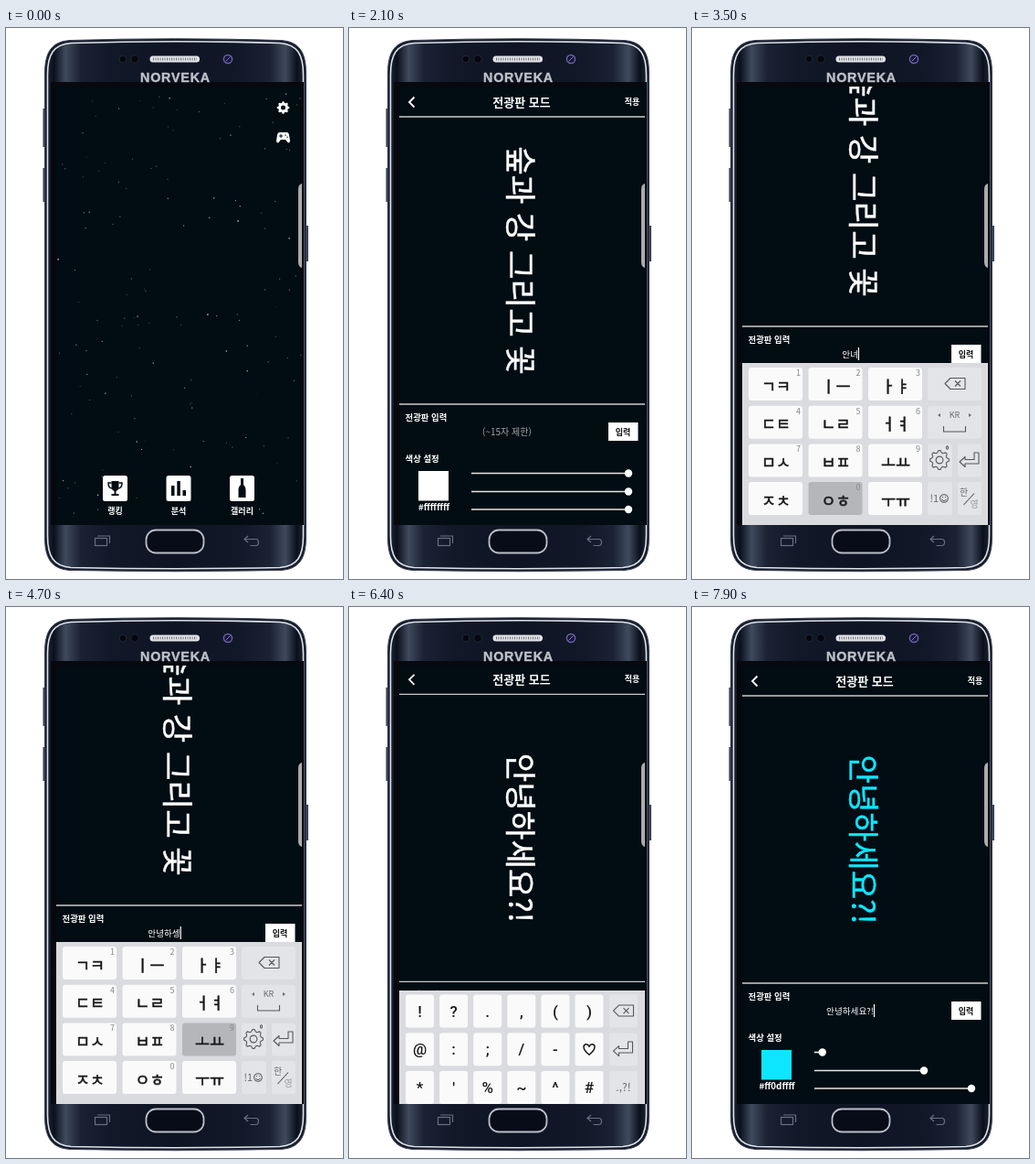
These frames come from a looping animation (369 by 602 pixels, 8 s). An HTML page:

```html
<!DOCTYPE html>
<html lang="ko">
<head>
<meta charset="utf-8">
<title>LED sign mode</title>
<style>
html, body { margin: 0; width: 100%; height: 100%; overflow: hidden; background: #fff; }
svg { display: block; width: 100vw; height: 100vh; }
text { font-family: "Noto Sans CJK KR", "Noto Sans CJK JP", "Noto Sans CJK", sans-serif; fill: #fff; }
.b { font-weight: 700; }
.mid { text-anchor: middle; }
.rule { stroke: #c9cbcd; stroke-width: 1.3; }
.chev { fill: none; stroke: #fff; stroke-width: 1.8; }
.key { fill: #fafafa; }
.fn { fill: #e3e4e7; }
.key.on, .fn.on { fill: #b5b6ba; }
.ink { fill: none; stroke: #55585c; stroke-width: 1.1; stroke-linejoin: round; }
#pad text { fill: #17181a; }
#pad .jamo { stroke: #17181a; stroke-width: .5; }
#pad .num { fill: #85878b; font-size: 9px; text-anchor: end; }
#pad .soft { fill: #66696d; }
#pad .pale { fill: #9a9da1; }
#led { stroke-width: .5; }

.slide, #scroll, #pad, #rest, #modes, #knob { animation: 8s linear infinite; }
#settings { animation-name: settings; }
#sign { animation-name: sign; }
#scroll { animation-name: scroll; }
#pad { animation-name: pad; }
#rest { animation-name: rest; }
#modes { animation-name: modes; }
#knob { animation-name: knob; }
@keyframes settings {
  0%, 3.6% { transform: translateX(270px); }
  3.75% { transform: translateX(250px); }
  5% { transform: translateX(90px); }
  6.25% { transform: translateX(22px); }
  7.5% { transform: translateX(4px); }
  8.5%, 100% { transform: none; }
}
@keyframes sign {
  0%, 18.6% { transform: translateX(270px); }
  18.75% { transform: translateX(257px); }
  20% { transform: translateX(90px); }
  21.25% { transform: translateX(22px); }
  22.5% { transform: translateX(4px); }
  23.6%, 100% { transform: none; }
}
@keyframes scroll {
  0%, 28.4% { transform: none; }
  28.75% { transform: translateY(-22px); }
  30% { transform: translateY(-66px); }
  31.25%, 77.2% { transform: translateY(-85px); }
  77.5% { transform: translateY(-70px); }
  78.75% { transform: translateY(-24px); }
  80% { transform: translateY(-1.7px); }
  81.25%, 100% { transform: none; }
}
@keyframes pad {
  0%, 28.4% { transform: translateY(180px); }
  28.75% { transform: translateY(130px); }
  30% { transform: translateY(45px); }
  31.25%, 77.2% { transform: none; }
  77.5% { transform: translateY(6px); }
  78.75% { transform: translateY(24px); }
  80% { transform: translateY(52px); }
  81.25% { transform: translateY(108px); }
  82.5% { transform: translateY(155px); }
  83.75%, 100% { transform: translateY(180px); }
}
@keyframes rest {
  0%, 9.6% { transform: translateY(-98px); }
  12.4%, 100% { transform: none; }
}
@keyframes modes {
  0%, 10% { opacity: 0; }
  12.4%, 100% { opacity: 1; }
}
@keyframes knob {
  0%, 17.6% { transform: translateX(-3px); }
  18.75% { transform: none; }
  20%, 100% { transform: translateX(9px); }
}
</style>
</head>
<body>
<svg viewBox="0 0 369 602" preserveAspectRatio="none">
  <defs>
    <linearGradient id="metal">
      <stop offset="0" stop-color="#1c2433"/><stop offset=".025" stop-color="#0b101c"/>
      <stop offset=".07" stop-color="#3f4a5d"/><stop offset=".13" stop-color="#1a2233"/>
      <stop offset=".25" stop-color="#111828"/><stop offset=".5" stop-color="#0e1423"/>
      <stop offset=".75" stop-color="#111828"/><stop offset=".87" stop-color="#1a2233"/>
      <stop offset=".93" stop-color="#3f4a5d"/><stop offset=".975" stop-color="#0b101c"/>
      <stop offset="1" stop-color="#1c2433"/>
    </linearGradient>
    <clipPath id="view"><rect x="55" y="64" width="269" height="479"/></clipPath>
  </defs>

  <g id="phone">
    <path d="M41.500 88v42M41.500 153v37M330 216v39" stroke="#3a4254" stroke-width="2"/>
    <path d="M42.500 50C42.500 26 50 15 70 13.500Q185.500 10 301 13.500C321 15 328.500 26 328.500 50V556C328.500 580 321 591 301 592.500Q185.500 595 70 592.500C50 591 42.500 580 42.500 556Z"
      fill="#161d2c" stroke="#3a4254"/>
    <path d="M45.500 51C45.500 29 52 18 71 16.500Q185.500 13 300 16.500C319 18 325.500 29 325.500 51V555C325.500 577 319 588 300 589.500Q185.500 592 71 589.500C52 588 45.500 577 45.500 555Z"
      fill="url(#metal)" stroke="#dfe2e8" stroke-width="1.600"/>
    <rect x="49" y="59" width="277" height="484" fill="#07090e"/>
    <g fill="#05070d" stroke="#262d3c" stroke-width=".8">
      <circle cx="128" cy="34" r="3.800"/><circle cx="141" cy="34" r="4.200"/>
    </g>
    <rect x="157.500" y="30.500" width="54.500" height="7" rx="3.500" fill="#e3e4e8"/>
    <path d="M161 34h48" stroke="#6d7079" stroke-width="3" stroke-dasharray="1 1.500"/>
    <circle cx="243" cy="34" r="4.600" fill="#161539" stroke="#6a62a6" stroke-width="1.500"/>
    <path d="M240.500 36.500l5-5" stroke="#8a7fc0"/>
    <text class="mid" x="185.500" y="58.500" stroke="#bfc3ca" stroke-width=".4" style="font:bold 14.300px 'Liberation Sans',sans-serif;letter-spacing:.8px;fill:#bfc3ca">NORVEKA</text>
    <rect x="153.500" y="548.500" width="63" height="25" rx="10.500" fill="#070c18" stroke="#b9bec8" stroke-width="1.800"/>
    <g fill="none" stroke="#667080" stroke-width="1.200">
      <rect x="97.500" y="557.500" width="13" height="8"/><path d="M100 555h13.500v8"/>
      <path d="M265 555l-4 3.500l4 3.500M261.500 558.500h12q3 0 3 3.500t-3 3.500h-6"/>
    </g>
  </g>

  <g clip-path="url(#view)">
    <g id="home"><rect x="55" y="64" width="269" height="479" fill="#010c13"/></g>
    <g id="settings" class="slide"></g>
    <g id="sign" class="slide">
      <rect x="55" y="64" width="269" height="479" fill="#010c13"/>
      <g id="scroll">
        <path class="chev" d="M71.500 75.500l-5.500 5.500l5.500 5.500"/>
        <text class="b mid" x="189" y="85.500" font-size="13">전광판 모드</text>
        <text class="b mid" x="310" y="84" font-size="9">적용</text>
        <path class="rule" d="M55 97h269M55 411h269"/>
        <text id="led" class="mid" transform="translate(175 254) rotate(90)" font-size="34.300"></text>
        <text class="b" x="61.500" y="428.500" font-size="9.400">전광판 입력</text>
        <text id="hint" class="mid" x="173" y="445" font-size="10" style="fill:#a5a8ab">(~15자 제한)</text>
        <text id="typed" class="mid" x="173" y="444.500" font-size="9.600"></text>
        <rect id="caret" y="434" width="1.200" height="14" fill="#fff"/>
        <rect x="284" y="431" width="32.500" height="20" fill="#fff"/>
        <text class="b mid" x="300" y="444.500" font-size="9" style="fill:#111">입력</text>
        <text class="b" x="61.500" y="474" font-size="9.400">색상 설정</text>
        <rect id="swatch" x="76" y="484" width="33" height="32.500"/>
        <text id="hex" class="b mid" x="93" y="526.500" font-size="9.800"></text>
        <g id="sliders"></g>
      </g>
    </g>
    <g id="pad"><rect x="55" y="366" width="269" height="180" fill="#d9dbdf"/></g>
  </g>
  <path d="M324 170q-4 1-4 6v80q0 5 4 6z" fill="#a9abae"/>
</svg>

<script>
const $ = id => document.getElementById(id);
const add = (id, markup) => $(id).insertAdjacentHTML('beforeend', markup);
const text = (x, y, size, str, cls = '') =>
  `<text class="${cls}" x="${x}" y="${y}" font-size="${size}">${str}</text>`;
const chevron = y => `<path class="chev" d="M304.500 ${y - 4.5}l4.500 4.500l-4.500 4.500"/>`;
const rule = y => `<path class="rule" d="M55 ${y}h269"/>`;

function gear(cx, cy, r, attrs) {
  let d = '';
  for (let i = 0; i < 32; i++) {
    const a = (i - .5) * Math.PI / 16, k = i % 4 < 2 ? r : r * .79;
    d += `${i ? 'L' : 'M'}${(cx + k * Math.cos(a)).toFixed(1)} ${(cy + k * Math.sin(a)).toFixed(1)}`;
  }
  const h = r * .37;
  return `<path fill-rule="evenodd" ${attrs} d="${d}zM${cx - h} ${cy}a${h} ${h} 0 1 0 ${2 * h} 0a${h} ${h} 0 1 0 ${-2 * h} 0z"/>`;
}

function buildHome() {
  let seed = 41;
  const rnd = () => (seed = seed * 16807 % 2147483647) / 2147483647;
  const tints = ['#fff', '#c8b9a4', '#9fb6c8'];
  let out = '';
  for (let i = 0; i < 140; i++) {
    const x = 57 + rnd() * 266, y = 66 + rnd() * 475;
    out += `<circle cx="${x.toFixed(1)}" cy="${y.toFixed(1)}" r="${(.45 + rnd() * .4).toFixed(2)}"
      fill="${tints[i % 3]}" opacity="${(.25 + rnd() * .6).toFixed(2)}"/>`;
  }
  out += gear(303.5, 87, 6.8, 'fill="#fff"');
  out += `<path fill="#fff" d="M299.500 114h8q2 0 2.500 3l1 6q0 2.500-2 2.500l-3-3.500h-5l-3 3.500q-2 0-2-2.500l1-6q.5-3 2.500-3z"/>
    <path d="M299 118h4M301 116v4M306 116.500v1.500M308 118.500v1.500" stroke="#010c13"/>`;
  const icons = [
    '<path d="M-4-8h8v6q0 4-3 5v3h3v2h-8v-2h3v-3q-3-1-3-5z"/><path d="M-4-6h-3.500q0 6 4.500 6M4-6h3.500q0 6-4.500 6" fill="none" stroke="#010c13" stroke-width="1.500"/>',
    '<path d="M-8-3h3.500v11h-3.500zM-1.700-8h3.500v16h-3.500zM4.500 2h3.500v6h-3.500z"/>',
    '<path d="M-1.500-11h3v7q2.500 2 2.500 5v9h-8v-9q0-3 2.500-5z"/>'
  ];
  ['랭킹', '분석', '갤러리'].forEach((name, i) => {
    const x = 119.5 + i * 69.5;
    out += `<rect x="${x - 13.5}" y="489" width="27" height="28" rx="2.500" fill="#fff"/>
      <g transform="translate(${x} 503)" fill="#010c13">${icons[i]}</g>` + text(x, 531, 9, name, 'b mid');
  });
  add('home', out);
}

function buildSettings() {
  const modes = [['기본 모드', 228, 119.5], ['메시지 모드', 254, 127.5],
                 ['룰렛 모드', 280.5, 119.5], ['전광판 모드', 307, 127.5]];
  const links = [['없는 술이 있어요!', 337], ['오픈소스 라이선스', 370], ['개인정보처리방침', 404]];
  let out = `<rect x="55" y="64" width="269" height="479" fill="#010c13"/>
    <path class="chev" d="M71.500 75.500l-5.500 5.500l5.500 5.500"/>
    <circle cx="189" cy="141" r="31" fill="#fff"/>
    <path class="chev" d="M302.500 203l4.500 4.500l4.500-4.500"/>`;
  out += text(189, 85.5, 13, '설정', 'b mid') + rule(188) + text(75, 208.5, 9.2, '모드설정', 'b');
  out += '<g id="modes">';
  modes.forEach(([name, y, x], i) => {
    out += text(75, y + 3.5, 9.3, name)
      + `<circle cx="${x}" cy="${y}" r="4.600" fill="#fff"/>
         <path d="M${x} ${y - 2.7}v1.300M${x} ${y - .7}v3.400" stroke="#010c13" stroke-width="1.300"/>`;
    if (i === 0) out += `<rect x="293" y="${y - 4.5}" width="17" height="9" rx="4.500" fill="#55595e"/>`;
    if (i === 3) out += `<rect x="292" y="${y - 4.5}" width="18" height="9" rx="4.500" fill="#73777b"/>
      <g id="knob"><circle cx="298" cy="${y}" r="10.500" fill="#fff" opacity=".15"/><circle cx="298" cy="${y}" r="6" fill="#fff"/></g>`;
    else out += `<circle cx="${i ? 295 : 307}" cy="${y}" r="6.500" fill="#f4f4f4"/>`;
  });
  out += '</g><g id="rest">' + rule(320);
  links.forEach(([name, y]) => out += text(75, y + 3.5, 9.2, name, 'b') + chevron(y) + rule(y + 16.3));
  out += '</g>' + rule(508.5) + text(75, 528.5, 9.2, '로그아웃', 'b') + chevron(525) + rule(541.5);
  add('settings', out);
}

const keys = {};
const key = (id, x, y, w, cls = 'key') =>
  `<rect data-key="${id}" class="${cls}" x="${x}" y="${y}" width="${w}" height="36" rx="3"/>`;
const backspace = (x, y) =>
  `<path class="ink" d="M${x - 11} ${y}l6-6h16v12h-16zM${x} ${y - 3}l6 6m0-6l-6 6"/>`;
const enter = (x, y) =>
  `<path class="ink" d="M${x - 11} ${y + 2}l6-5.500v3h10v-7.500h5v12h-15v3.500z"/>`;

function buildPad() {
  const rowY = r => 371 + r * 41.7;
  const jamo = ['ㄱㅋ', 'ㅣㅡ', 'ㅏㅑ', 'ㄷㅌ', 'ㄴㄹ', 'ㅓㅕ', 'ㅁㅅ', 'ㅂㅍ', 'ㅗㅛ', 'ㅈㅊ', 'ㅇㅎ', 'ㅜㅠ'];
  let out = '<g id="hangul">';
  jamo.forEach((pair, i) => {
    const x = 62 + i % 3 * 65.5, y = rowY(i / 3 | 0);
    out += key(pair[0], x, y, 59) + text(x + 30, y + 26.5, 17.4, pair, 'mid jamo');
    if (i !== 9 && i !== 11) out += text(x + 57, y + 9, 9, i === 10 ? 0 : i + 1, 'num');
  });
  out += key('back', 258, rowY(0), 59, 'fn') + backspace(288, 388.5)
    + key('space', 258, rowY(1), 59, 'fn') + text(287.5, 426, 9, 'KR', 'mid soft')
    + '<path class="soft" fill="#66696d" d="M272 421l-3 2l3 2zM303 421l3 2l-3 2z"/>'
    + '<path class="ink" d="M275.500 435v6h24v-6"/>'
    + key('set', 258, rowY(2), 27, 'fn') + gear(271, 472, 10.5, 'class="ink"')
    + '<ellipse class="ink" cx="279.500" cy="458.500" rx="1" ry="1.800"/>'
    + key('enter', 291, rowY(2), 26, 'fn') + enter(304, 472)
    + key('sym', 258, rowY(3), 27, 'fn') + text(260.5, 518, 11, '!1', 'soft')
    + '<circle class="ink" cx="276" cy="514" r="4.300"/><path class="ink" d="M273.500 515q2.500 3 5 0M274.500 512v1M277.500 512v1"/>'
    + key('lang', 291, rowY(3), 26, 'fn') + text(293, 511, 10, '한', 'soft') + text(304.5, 523.5, 10, '영', 'pale')
    + '<path class="ink" d="M297.500 521l11.500-12.500"/></g><g id="symbols">';

  ['!?.,()', '@:;/-♡', "*'%~^#"].forEach((row, r) => [...row].forEach((ch, c) => {
    const x = 62 + c * 37.1, y = rowY(r);
    out += key(ch, x, y, 31);
    out += ch === '♡'
      ? `<path class="ink" style="stroke:#17181a;stroke-width:1.500" d="M${x + 15.5} ${y + 24}q-6-5-6-8.500q0-3 3-3q2 0 3 2.500q1-2.500 3-2.500q3 0 3 3q0 3.500-6 8.500z"/>`
      : `<text class="mid" x="${x + 15.5}" y="${y + 24}" style="font:500 17px Roboto,sans-serif">${ch}</text>`;
  }));
  for (let r = 0; r < 3; r++) out += key('f' + r, 285, rowY(r), 31, 'fn');
  out += backspace(300.5, 388.5) + enter(300.5, 430.5) + text(300.5, 476, 12, '.,?!', 'mid soft');
  [['가', 62, 31], ['1/2', 99, 31], ['', 136, 105], ['123', 247, 31], ['☺', 285, 31]].forEach(([s, x, w], i) =>
    out += key('g' + i, x, rowY(3), w, 'fn') + text(x + w / 2, rowY(3) + 22, 11, s, 'mid soft'));
  add('pad', out + '</g>');
  document.querySelectorAll('[data-key]').forEach(el => keys[el.dataset.key] = el);
}

buildHome();
buildSettings();
buildPad();
const sliders = [486.5, 506.5, 526].map(y => {
  add('sliders', `<g><path stroke="#e9e6df" stroke-width="1.700"/><circle cy="${y}" r="4.200" fill="#fff"/></g>`);
  const [track, dot] = $('sliders').lastElementChild.children;
  return x => { track.setAttribute('d', `M134 ${y}H${x}`); dot.setAttribute('cx', x); };
});

const presses = [
  [2700, 'ㅇ'], [2800, 'ㅏ'], [2900, 'ㄴ'], [3000, 'space'], [3100, 'ㄴ'], [3200, 'ㅓ'], [3300, 'ㅓ'],
  [3500, 'ㅇ'], [3600, 'space'], [3700, 'ㅇ'], [3800, 'ㅇ'], [3900, 'ㅏ'],
  [4200, 'ㅁ'], [4300, 'ㅁ'], [4400, 'ㅓ'], [4500, 'ㅣ'], [4600, 'ㅇ'], [4700, 'ㅗ'], [4800, 'ㅗ'],
  [5000, 'sym'], [5500, '?']
];
const drafts = [
  [0, ''], [2800, 'ㅇ'], [2900, '아'], [3000, '안'], [3200, '안ㄴ'], [3300, '안너'], [3400, '안녀'], [3600, '안녕'],
  [3800, '안녕ㅇ'], [3900, '안녕ㅎ'], [4000, '안녕하'], [4300, '안녕함'], [4400, '안녕핫'], [4500, '안녕하서'],
  [4600, '안녕하세'], [4700, '안녕하셍'], [4800, '안녕하세오'], [4900, '안녕하세요'],
  [5600, '안녕하세요?'], [5800, '안녕하세요?!']
];
const latest = (list, t) => list.filter(e => e[0] <= t).pop()[1];
const ramp = (t, a, b) => Math.min(1, Math.max(0, (t - a) / (b - a)));
const set = (id, str) => { if ($(id).textContent !== str) $(id).textContent = str; };
const show = (id, on) => $(id).style.display = on ? '' : 'none';

function draw(t) {
  for (const id in keys) keys[id].classList.remove('on');
  const held = presses.find(([at]) => t >= at && t < at + 100);
  if (held) keys[held[1]].classList.add('on');
  show('hangul', t < 5100);
  show('symbols', t >= 5100);

  const draft = latest(drafts, t);
  set('typed', draft);
  show('hint', !draft);
  const width = $(draft ? 'typed' : 'hint').getComputedTextLength();
  $('caret').setAttribute('x', 173 + (draft ? 1 : -1) * width / 2);
  show('caret', t < 2100 || t >= 2300 && t < 6000 || t >= 6500);
  set('led', t < 6000 ? '숲과 강 그리고 꽃' : '안녕하세요?!');

  const k = ramp(t, 6850, 7400), red = Math.round(255 - 242 * k);
  const color = `rgb(${red},${Math.round(255 - 25 * k)},255)`;
  $('led').style.fill = $('led').style.stroke = color;
  $('swatch').style.fill = color;
  set('hex', '#ff' + red.toString(16).padStart(2, '0') + 'ffff');
  sliders[0](134 + 172 * red / 255);
  sliders[1](306 - 50 * ramp(t, 7450, 7700) - 2 * ramp(t, 7700, 7900));
  sliders[2](306);
}

const start = performance.now();
const LEAD = 20; // covers display latency
function tick(now) {
  draw((Math.max(0, now - start) + LEAD) % 8000);
  requestAnimationFrame(tick);
}
draw(0);
requestAnimationFrame(tick);
</script>
</body>
</html>
```
